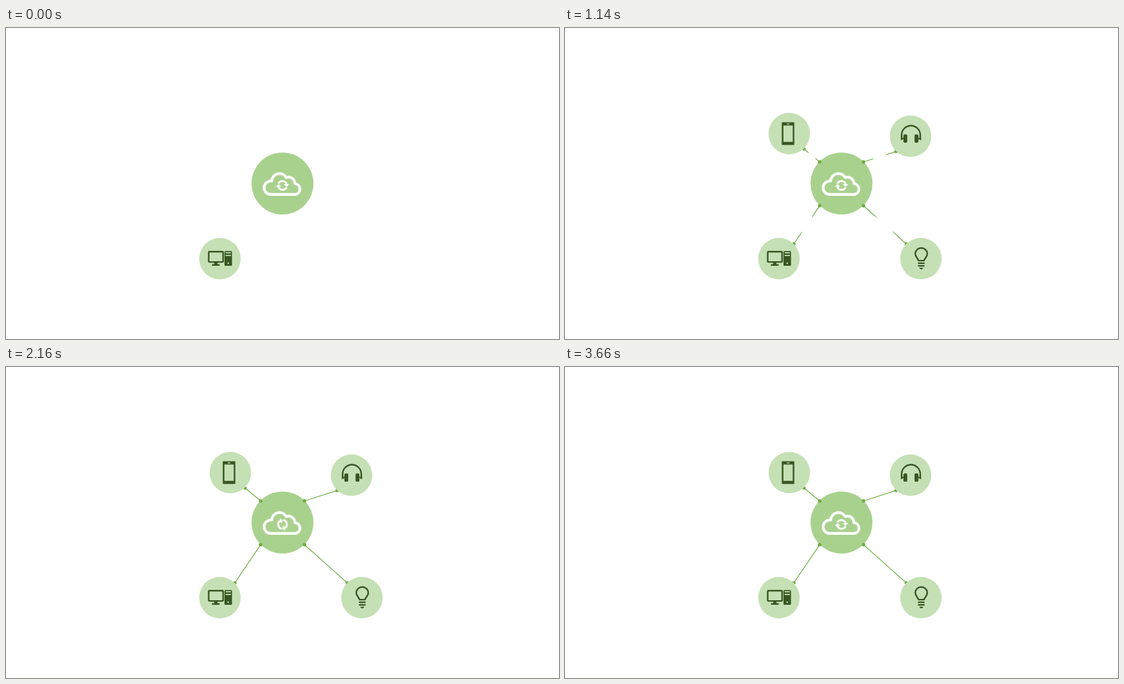
Write an HTML page that moves like this. It is 853 by 480 pixels and loops after 3720 ms.

```html
<!DOCTYPE html>
<html lang="en">
<head>
<meta charset="utf-8">
<title>Cloud sync</title>
<style>
  @property --edge {
    syntax: "<percentage>";
    inherits: false;
    initial-value: 0%;
  }
  html, body {
    margin: 0;
    width: 100%;
    height: 100%;
    overflow: hidden;
    background: #fff;
  }
  svg { position: absolute; display: block; }
  .stage { left: 0; top: 0; width: 853px; height: 480px; }

  .link, .fade, .spin { animation: 3720ms linear infinite; }

  /* Links grow inwards from both ends with a soft edge. */
  .link {
    stroke: #70ad47;
    stroke-width: 1.2;
    --ramp: #000 calc(var(--edge) - 5%), transparent var(--edge);
    -webkit-mask-image: linear-gradient(90deg, var(--ramp)), linear-gradient(270deg, var(--ramp));
    mask-image: linear-gradient(90deg, var(--ramp)), linear-gradient(270deg, var(--ramp));
    animation-name: grow;
  }
  .link circle { fill: #70ad47; stroke: none; }
  .fade { animation-name: fade; }
  .spin { transform-origin: 0 0; animation-name: spin; }

  .disc { fill: #c5e0b4; }
  .ink { fill: #375623; }
  .line { fill: none; stroke: #375623; }

  @keyframes grow {
    0% { --edge: 0%; }
    48.39%, 100% { --edge: 55%; }
  }
  @keyframes fade {
    0% { opacity: 0; }
    12.1%, 100% { opacity: 1; }
  }
  @keyframes spin {
    0%, 47.3% { transform: rotate(0deg); }
    98.4%, 100% { transform: rotate(360deg); }
  }
</style>
</head>
<body>

<svg class="stage" viewBox="0 0 853 480">
  <circle cx="426.5" cy="240" r="47.8" fill="#a9d18e"/>
  <path d="M408 256.9A10.3 10.3 0 0 1 398.1 246.5A10.4 10.4 0 0 1 409.8 236.2A12 12 0 0 1 432.3 230.8A10 10 0 0 1 445.6 240.2A8.5 8.5 0 0 1 447 256.9Z"
        fill="none" stroke="#fff" stroke-width="4.2" stroke-linejoin="round"/>
  <g transform="translate(426.5 243)">
    <g class="spin">
      <defs>
        <g id="arrow">
          <path d="M-6.3 -2.9A6.9 6.9 0 0 1 6.4 -2" fill="none" stroke="#fff" stroke-width="2.9"/>
          <path d="M1.8 -1.9H10.4L6.2 2.3Z" fill="#fff"/>
        </g>
      </defs>
      <use href="#arrow"/>
      <use href="#arrow" transform="rotate(180)"/>
    </g>
  </g>
</svg>

<svg class="link" viewBox="366 183 30 27" style="left:366px;top:183px;width:30px;height:27px">
  <path d="M368.8 186.8L392.8 206.8"/>
  <circle cx="368.8" cy="186.8" r="2.6"/><circle cx="392.8" cy="206.8" r="2.7"/>
</svg>
<svg class="link" viewBox="457 187 57 23" style="left:457px;top:187px;width:57px;height:23px">
  <path d="M460.4 206.8L510.6 190.6"/>
  <circle cx="460.4" cy="206.8" r="2.7"/><circle cx="510.6" cy="190.6" r="2.6"/>
</svg>
<svg class="link" viewBox="350 271 46 65" style="left:350px;top:271px;width:46px;height:65px">
  <path d="M392.8 274.3L353 333.2"/>
  <circle cx="392.8" cy="274.3" r="2.7"/><circle cx="353" cy="333.2" r="2.6"/>
</svg>
<svg class="link" viewBox="457 271 72 65" style="left:457px;top:271px;width:72px;height:65px">
  <path d="M460.4 274.3L526.4 333.2"/>
  <circle cx="460.4" cy="274.3" r="2.7"/><circle cx="526.4" cy="333.2" r="2.6"/>
</svg>

<svg class="stage" viewBox="0 0 853 480">
  <!-- computer -->
  <circle class="disc" cx="330" cy="356" r="32"/>
  <rect class="line" x="312.7" y="345.3" width="22.2" height="15.8" rx="1" stroke-width="2.4"/>
  <path class="ink" d="M321.2 362h4.9v2.6h3.4v2.4h-11.8v-2.4h3.5z"/>
  <rect class="ink" x="337" y="344.2" width="11.6" height="22.8" rx="1.6"/>
  <path class="disc" d="M338.7 346h8.2v1.8h-8.2zM338.7 350.2h8.2v1.8h-8.2z"/>
  <circle class="disc" cx="342.7" cy="363" r="1.2"/>

  <!-- phone -->
  <g class="fade">
    <circle class="disc" cx="346" cy="163" r="32"/>
    <rect class="ink" x="334.4" y="145.4" width="19.3" height="35.2" rx=".8"/>
    <path class="disc" d="M336.9 150.4h14.4v25.4h-14.4zM342 147.4h4.2v1.4h-4.2z"/>
  </g>

  <!-- headphones -->
  <g class="fade">
    <circle class="disc" cx="533" cy="167" r="32"/>
    <path class="line" d="M519.2 172.4V165.2A14.4 14.4 0 0 1 548 165.2V172.4" stroke-width="2.4"/>
    <path class="ink" d="M518 169.5h4.5v1.5l-4.5 2.3zM549.2 169.5h-4.5v1.5l4.5 2.3z"/>
    <rect class="ink" x="522" y="164.3" width="5.9" height="12.7" rx="1.8"/>
    <rect class="ink" x="539.2" y="164.3" width="5.9" height="12.7" rx="1.8"/>
  </g>

  <!-- bulb -->
  <g class="fade">
    <circle class="disc" cx="549" cy="356" r="32"/>
    <path class="line" d="M545.4 359.1C544.6 355.6 540.3 353.8 540.3 348.6A9.25 9.1 0 0 1 558.8 348.6C558.8 353.8 554.5 355.6 553.7 359.1Z"
          stroke-width="2.4" stroke-linejoin="round"/>
    <rect class="ink" x="544.2" y="362" width="10.7" height="2.3" rx="1.1"/>
    <rect class="ink" x="544.2" y="366" width="10.7" height="2.3" rx="1.1"/>
    <path class="ink" d="M546.6 370H552.5Q551.6 372.6 549.5 372.6T546.6 370Z"/>
  </g>
</svg>

</body>
</html>
```
